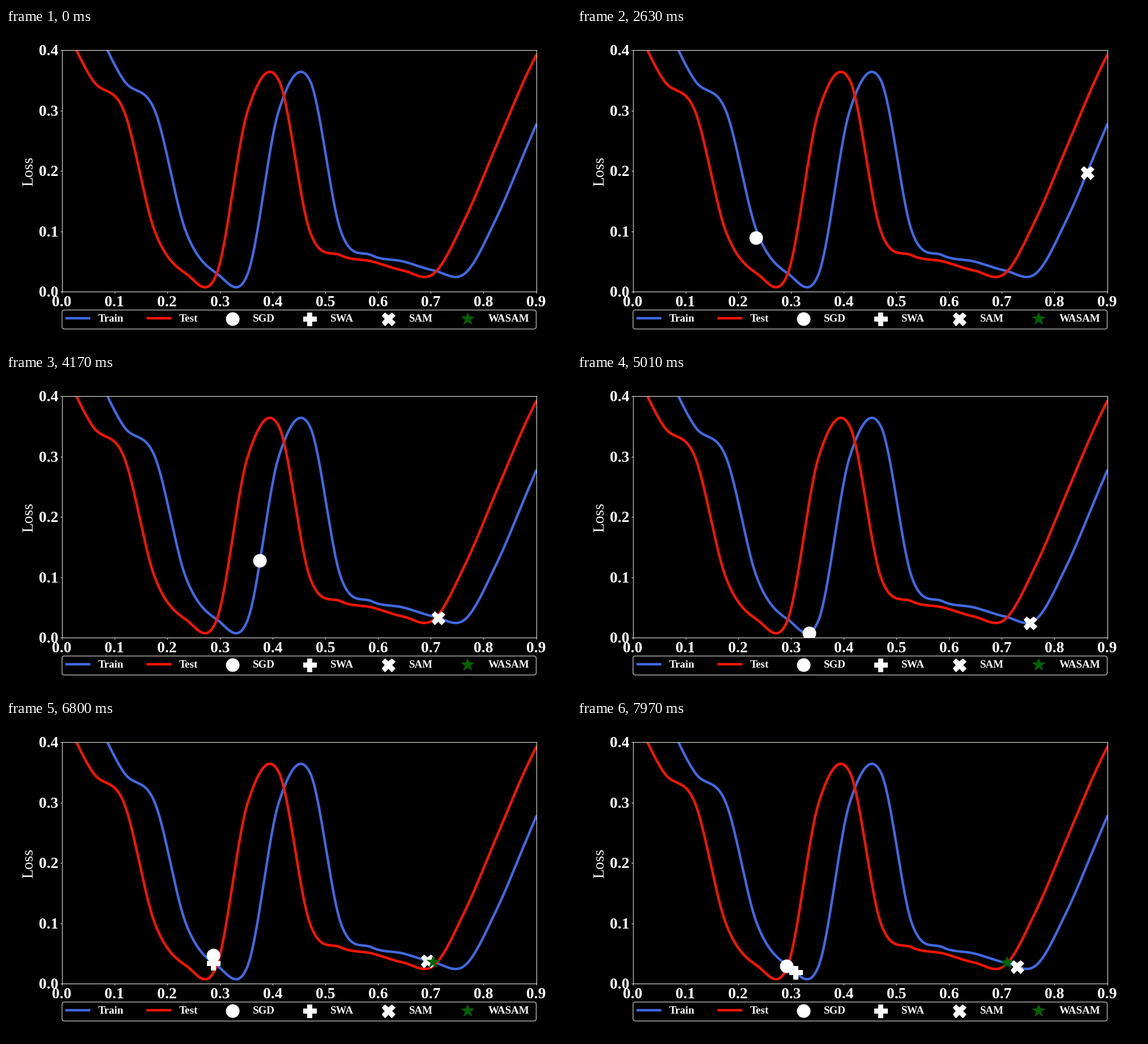
Animation, 998 px wide and 561 px high, one loop 8000 ms. Source, as a matplotlib script:

```python
import numpy as np
import matplotlib.pyplot as plt
from matplotlib.animation import FuncAnimation
from matplotlib.patches import FancyBboxPatch

W, H, DPI = 998, 561, 64
FRAMES, STEP = 200, 40
LEFT, RIGHT, TOP, BOTTOM = 98.5, 936.5, 39, 465
BLUE, RED, GREEN, FRAME = "#4169e1", "#ff1500", "#006400", "#e6e6dc"

plt.rcParams["font.family"] = "Liberation Serif"


def pt(px):
    return px * 72 / DPI


def smooth(x, knots, values):
    """Cubic Hermite curve through the knots with central-difference slopes."""
    knots, values = np.asarray(knots, float), np.asarray(values, float)
    slopes = np.gradient(values, knots)
    x = np.clip(x, knots[0], knots[-1])
    i = np.clip(np.searchsorted(knots, x, side="right") - 1, 0, len(knots) - 2)
    h = knots[i + 1] - knots[i]
    t = (x - knots[i]) / h
    return (values[i] * (1 + 2 * t) * (1 - t) ** 2
            + slopes[i] * h * t * (1 - t) ** 2
            + values[i + 1] * t * t * (3 - 2 * t)
            + slopes[i + 1] * h * t * t * (t - 1))


# Loss at evenly spaced nodes; the test curve is one node ahead
LOSS = [0.55, 0.45, 0.35, 0.30, 0.10, 0.03, 0.03, 0.30, 0.35, 0.10, 0.06,
        0.05, 0.035, 0.03, 0.12, 0.24, 0.36, 0.46]
NODE = 1 / 17
NODES = np.arange(len(LOSS)) * NODE


def train(x):
    return smooth(x, NODES, LOSS)


def test(x):
    return train(x + NODE)


# Waypoints along x: both optimisers roll in, overshoot, then wander.
# The averaged ones join late and trail their base optimiser.
START, JOIN = 1790, 5550
TIMES = [START, 2630, 3290, 5010, 6090, 6800, 7970]
PATHS = {
    "SWA": [0.335, 0.313, 0.2875, 0.309],
    "SGD": [0.088, 0.235, 0.354, 0.335, 0.2995, 0.2875, 0.292],
    "SAM": [1.02, 0.860, 0.728, 0.753, 0.7315, 0.694, 0.729],
    "WASAM": [0.753, 0.7355, 0.7045, 0.709],
}
SGD_LIFT = [0, -0.016, -0.004, 0, -0.012, 0.0125, -0.002]
SHAPES = {"SGD": ("o", "white"), "SWA": ("P", "white"),
          "SAM": ("X", "white"), "WASAM": ("*", GREEN)}

fig = plt.figure(figsize=(W / DPI, H / DPI), dpi=DPI, facecolor="black")

# Pixel-space layer for labels and legend
page = fig.add_axes([0, 0, 1, 1])
page.set(xlim=(0, W), ylim=(H, 0))
page.axis("off")

ax = fig.add_axes([LEFT / W, 1 - BOTTOM / H,
                   (RIGHT - LEFT) / W, (BOTTOM - TOP) / H])
ax.set(xlim=(0, 0.9), ylim=(0, 0.4), facecolor="none",
       xticks=np.arange(10) / 10, yticks=np.arange(5) / 10)
ax.tick_params(length=pt(3), width=pt(1), color=FRAME,
               labelbottom=False, labelleft=False)
for spine in ax.spines.values():
    spine.set(color=FRAME, linewidth=pt(1.1))


def label(x, y, text, size=27.6, weight="bold", va="baseline", **kw):
    page.text(x, y, text, color="white", fontsize=pt(size), weight=weight,
              va=va, **kw)


def marker(axes, name, x, y, z=3):
    shape, color = SHAPES[name]
    return axes.plot([x], [y], ls="", marker=shape, color=color,
                     ms=pt(23), mew=pt(1), zorder=z)[0]


for k in range(10):
    label(LEFT + k * (RIGHT - LEFT) / 9, 490.5, f"{k / 10:.1f}", ha="center")
for k in range(5):
    label(75, BOTTOM - k * (BOTTOM - TOP) / 4 + 9, f"{k / 10:.1f}", ha="center")
label(53.5, 253, "Loss", weight="normal", rotation=90, ha="right", va="center")

xs = np.linspace(0, 0.9, 700)
for curve, color in ((train, BLUE), (test, RED)):
    ax.plot(xs, curve(xs), color=color, lw=pt(4.4), zorder=2)

# Legend
page.add_patch(FancyBboxPatch((99, 497.5), 837.5, 33.5, fc="none", ec="#d0d0d0",
                              lw=pt(1.2),
                              boxstyle="round,pad=0,rounding_size=4"))
for x, color, name in ((105, BLUE, "Train"), (248, RED, "Test")):
    page.plot([x, x + 44], [512, 512], color=color, lw=pt(4.4),
              solid_capstyle="butt")
    label(x + 58, 518.5, name, size=19)
for name, x, text_x in (("SGD", 400, 435.5), ("SWA", 536.5, 572.5),
                        ("SAM", 675.5, 711.5), ("WASAM", 815.5, 852)):
    marker(page, name, x, 513)
    label(text_x, 518.5, name, size=19)

dots = {name: marker(ax, name, 0, 0, 3 + z) for z, name in enumerate(PATHS)}


def draw(frame):
    now = (frame + 0.5) * STEP
    for name, dot in dots.items():
        path = PATHS[name]
        x = smooth(now, TIMES[-len(path):], path)
        lift = smooth(now, TIMES, SGD_LIFT) if name == "SGD" else 0
        dot.set_data([x], [train(x) + lift])
        dot.set_visible(now >= (START if name in ("SGD", "SAM") else JOIN))
    return list(dots.values())


anim = FuncAnimation(fig, draw, frames=FRAMES, interval=STEP, repeat=True,
                     repeat_delay=0)
plt.show()
```
